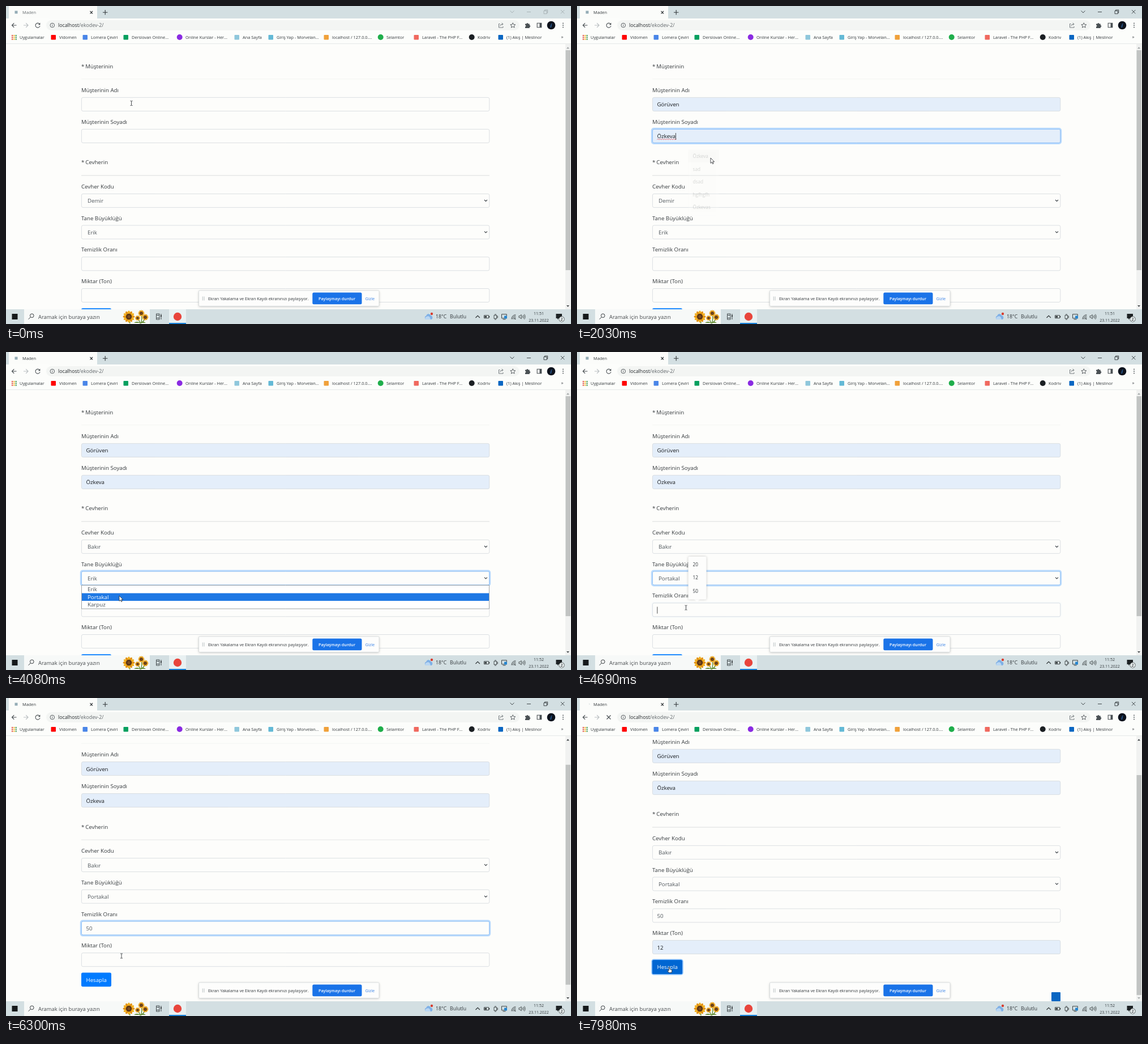
Write an HTML page with a canvas that moves like this. It is 998 px wide and 561 px high and loops after 8 s.

```html
<!DOCTYPE html>
<html lang="tr">
<head>
<meta charset="utf-8">
<title>Maden</title>
<style>
html, body { margin: 0; width: 100%; height: 100%; overflow: hidden; background: #fdfdfb; }
canvas { display: block; }
</style>
</head>
<body>
<canvas id="stage" width="998" height="561"></canvas>
<script>
const ctx = document.getElementById('stage').getContext('2d');
const LOOP = 8000, INK = '#34393d', ICON = '#4a5054', PAGE = '#fdfdfb', BAR = '#d3dfe2';
const LABEL_SIZE = 9.7;

const clamp = v => Math.max(0, Math.min(1, v));
const ramp = (t, start, length) => { const u = clamp((t - start) / length); return u * u * (3 - 2 * u); };
const during = (t, from, to) => t >= from && t < to;

function rect(x, y, w, h, fill, radius = 0, stroke, width = 1) {
  ctx.beginPath();
  ctx.roundRect(x, y, w, h, radius);
  if (fill) { ctx.fillStyle = fill; ctx.fill(); }
  if (stroke) { ctx.strokeStyle = stroke; ctx.lineWidth = width; ctx.stroke(); }
}
function disc(x, y, r, fill) {
  ctx.beginPath();
  ctx.arc(x, y, r, 0, 7);
  ctx.fillStyle = fill;
  ctx.fill();
}
function line(d, color = ICON, width = 1) {
  ctx.strokeStyle = color;
  ctx.lineWidth = width;
  ctx.stroke(new Path2D(d));
}
function shape(d, color) {
  ctx.fillStyle = color;
  ctx.fill(new Path2D(d));
}
// y is the middle of the capital letters
function text(s, x, y, size, color = INK, weight = 400, align = 'left') {
  ctx.font = `${weight} ${size}px "Open Sans", "Noto Sans", sans-serif`;
  ctx.textAlign = align;
  ctx.fillStyle = color;
  ctx.fillText(s, x, y + size * 0.36);
  return ctx.measureText(s).width;
}
function withAlpha(a, draw) {
  if (a <= 0) return;
  ctx.save();
  ctx.globalAlpha *= a;
  draw();
  ctx.restore();
}

// values: [time, text]; focus: [from, to]; auto: time of autofill
const fields = [
  { label: 'Müşterinin Adı', y: 161, focus: [450, 1500], values: [[0, ''], [1050, 'Görüven']], auto: 1050 },
  { label: 'Müşterinin Soyadı', y: 217, focus: [1500, 2480], values: [[0, ''], [1950, 'Özkeva']], auto: 1950, typo: 1950 },
  { label: 'Cevher Kodu', y: 331, focus: [2480, 3450], values: [[0, 'Demir'], [3080, 'Bakır']], select: true },
  { label: 'Tane Büyüklüğü', y: 386.6, focus: [3450, 4670], values: [[0, 'Erik'], [4120, 'Portakal']], select: true },
  { label: 'Temizlik Oranı', y: 442.4, focus: [4670, 6780], values: [[0, ''], [5300, '5'], [5460, '50']] },
  { label: 'Miktar (Ton)', y: 498.1, focus: [6780, 7830], values: [[0, ''], [7400, '12']], auto: 7400 }
];

const pointerKeys = [
  [0, 221.5, 171.5, 'beam'], [500, 221.5, 171.5, 'beam'], [800, 228, 207, 'arrow'], [1100, 228, 207, 'arrow'],
  [1420, 225, 230, 'beam'], [1600, 225, 230, 'beam'], [1880, 236, 268, 'arrow'], [2060, 236, 268, 'arrow'],
  [2400, 222, 343, 'arrow'], [2600, 222, 343, 'arrow'], [2900, 206, 374, 'arrow'], [3120, 206, 374, 'arrow'],
  [3320, 202, 402, 'arrow'], [3550, 202, 402, 'arrow'], [3900, 200, 430, 'arrow'], [4180, 200, 430, 'arrow'],
  [4500, 192.5, 451, 'beam'], [4800, 192.5, 451, 'beam'], [5100, 204, 455, 'beam'], [6450, 204, 455, 'beam'],
  [6700, 204, 447, 'beam'], [6900, 204, 447, 'beam'], [7200, 209, 358, 'arrow'], [7440, 209, 358, 'arrow'],
  [7720, 163, 475, 'hand'], [8000, 163, 475, 'hand']
];

function drawField(f, t) {
  const [from, to] = f.focus;
  const ring = ramp(t, from, 150) - ramp(t, to, 150);
  const [since, value] = f.values.filter(v => v[0] <= t).pop();
  const filled = t >= f.auto, mid = f.y + 13;
  text(f.label, 133, f.y - 12.5, LABEL_SIZE);
  withAlpha(ring, () => rect(132, f.y - 1, 723, 26.7, null, 3.5, '#b9dafd', 2.4));
  rect(133.4, f.y + 0.4, 720.4, 24, filled ? '#e4eefa' : PAGE, 2.6, '#d3d8dc', 0.8);
  withAlpha(ring, () => rect(133.4, f.y + 0.4, 720.4, 24, null, 2.6, '#80bdff', 0.9));
  const x = f.select ? 144 : 141.5;
  const width = text(value, x, mid, LABEL_SIZE, filled ? '#181b1e' : '#50575d');
  if (f.select) {
    line(`M845 ${f.y + 11}l2.5 2.4 2.5-2.4`, '#3c4247', 1.1);
    return;
  }
  if (!during(t, from, to)) return;
  if (t >= f.typo) {
    let wave = `M${x} ${mid + 5.6}`;
    for (let i = 0; i < width / 2; i++) wave += `l1 ${i % 2 ? 1 : -1}l1 0`;
    line(wave, '#e0464a', 0.8);
  }
  if ((t - Math.max(since, from)) % 1060 < 530) rect(x + width, mid - 6, 0.8, 12, '#222');
}

function heading(s, y) {
  text('*', 133, y, LABEL_SIZE);
  text(s, 140.2, y, LABEL_SIZE);
}

function suggestions(t, from, to, items, y, w, row, hoverAt, above) {
  withAlpha(ramp(t, from, 90) * (1 - clamp((t - to) / 100)), () => {
    const h = items.length * row + 5, x = 196.5;
    ctx.shadowColor = `rgba(0,0,0,${0.22 * ctx.globalAlpha})`;
    ctx.shadowBlur = 4;
    rect(x, y, w, h, '#fdfdfc', 2);
    ctx.shadowBlur = 0;
    ctx.shadowColor = 'transparent';
    shape(above ? `M207 ${y + h}h10l-5 4z` : `M207 ${y}h10l-5-4z`, '#fdfdfc');
    if (t >= hoverAt) rect(x, y + 1.5, w, row, '#e6e7e8');
    items.forEach((s, i) => text(s, x + 8, y + 2 + row * (i + 0.5), 8.2));
  });
}

function optionList(t, from, to, hoverAt, items, y) {
  if (!during(t, from, to)) return;
  const row = 13.5, chosen = t < hoverAt ? 0 : 1;
  rect(133.5, y, 720, items.length * row + 1, '#fff', 0, '#8a8d90', 0.8);
  rect(134, y + 0.5 + chosen * row, 719, row, '#1e78e4');
  items.forEach((s, i) => text(s, 144, y + 0.5 + row * (i + 0.5), LABEL_SIZE, i === chosen ? '#fff' : '#495057'));
}

function drawPage(t, scroll) {
  rect(0, 0, 998, 561, PAGE);
  ctx.save();
  ctx.translate(0, -scroll);
  heading('Müşterinin', 106.5);
  rect(133, 128.6, 721, 0.7, '#f0f1ef');
  heading('Cevherin', 276);
  rect(133, 298.6, 721, 0.8, '#dcdedd');
  fields.forEach(f => drawField(f, t));
  const focus = ramp(t, 7830, 150), hover = ramp(t, 7660, 150);
  withAlpha(focus, () => rect(132.2, 532.4, 54.6, 26.4, null, 3.4, '#8fc3fb', 2));
  rect(133, 533.2, 53, 24.8, '#007bff', 2.6);
  withAlpha(hover, () => rect(133, 533.2, 53, 24.8, '#0066d2', 2.6));
  text('Hesapla', 141.5, 546, LABEL_SIZE, '#fff');
  rect(838, 590, 16, 16, '#0a66c2', 1);
  ctx.restore();

  suggestions(t, 480, 1050, ['Görüven', 'asd', 'sad'], 196, 54, 22.5, 780);
  suggestions(t, 1520, 1950, ['Özkeva', 'sad', 'dsad', 'hgfhgfh', 'Özkevas'], 252, 54, 22.5, 1830);
  optionList(t, 2500, 3080, 2850, ['Demir', 'Bakır', 'Kömür'], 356);
  optionList(t, 3470, 4120, 3850, ['Erik', 'Portakal', 'Karpuz'], 411.5);
  suggestions(t, 4600, 5300, ['20', '12', '50'], 361, 32, 23.5, Infinity, true);
  suggestions(t, 6830, 7400, ['12', '20', '50'], 346, 32, 23.5, 7170, true);

  rect(988, 67, 10, 468, '#f1f2f1');
  rect(988.5, 78 + scroll * 0.817, 8.5, 388, '#c1c3c2');
  shape('M990 75.2h5l-2.5-3z', scroll > 1 ? '#3f4346' : '#9fa3a4');
  shape('M990 528h5l-2.5 3z', scroll > 70 ? '#a8abac' : '#4a4e50');
}

const bookmarks = [
  [94, 'Vidomen', '#f00'], [150, 'Lomera Çeviri', '#4a86e8'], [222, 'Derslovan Online...', '#04a05f'],
  [317, 'Online Kurslar - Her...', '#8a2be2', true], [418, 'Ana Sayfa', '#8fc7dc'],
  [478, 'Giriş Yap - Morvelan...', '#63b9d6'], [576, 'localhost / 127.0.0....', '#f0a13a'],
  [672, 'Selamtor', '#1fae4b', true], [735, 'Laravel - The PHP F...', '#f0695f'],
  [833, 'Kodriv', '#1b1f23', true], [884, '(1) Akış | Meslinor', '#0a66c2']
];

function drawBrowser(t) {
  const active = t >= 450, loading = t >= 7930;
  const control = active ? '#33383b' : '#a4aeb1';
  rect(0, 0, 998, 22, BAR);
  rect(5, -6, 156, 34, '#fbfcfa', 6);
  rect(0, 22, 998, 45, '#fcfdfb');
  if (loading) {
    const a = t / 160;
    ctx.beginPath();
    ctx.arc(18, 11, 4, a, a + 0.6);
    ctx.strokeStyle = '#d0d7da';
    ctx.lineWidth = 1;
    ctx.stroke();
  } else rect(15.5, 8.5, 5, 5, '#94acb6');
  text('Maden', 29, 11, 7.4, active ? INK : '#666c70');
  line('M148.5 9l4.6 4.6m0-4.6l-4.6 4.6M171 11.3h8.4m-4.2-4.2v8.4', '#33383b', 1.1);
  line('M890.5 8.5l3.5 3.4 3.5-3.4M920 10.5h7M950 8.5h5.2v5.2h-5.2zM951.5 8.5v-1.6h5.2v5.2h-1.5M980 7l6.4 6.4m0-6.4l-6.4 6.4', control, 0.9);

  line('M18.5 34h-8m3.8-3.8l-3.8 3.8 3.8 3.8', ICON, 1.2);
  line('M31 34h8m-3.8-3.8l3.8 3.8-3.8 3.8', '#b9bfc1', 1.2);
  if (loading) line('M52.5 30.5l7 7m0-7l-7 7', ICON, 1.2);
  else {
    line('M59.2 31.6a4 4 0 1 0 .8 3.4', ICON, 1.1);
    shape('M60.4 29.6v3.6h-3.6z', ICON);
  }
  rect(71, 25, 836, 18, '#f3f5f3', 9);
  line('M78 34a3.8 3.8 0 1 0 7.6 0a3.8 3.8 0 1 0-7.6 0M81.8 33.5v2.4M81.8 31.7v1', ICON, 0.9);
  const host = text('localhost', 92, 34, 8.8, '#25292c');
  text('/ekodev-2/', 92 + host, 34, 8.8, '#62686c');
  line('M872.5 31.5h-2v6.5h7.5v-2M872.5 35.5q.5-3.6 5-3.6m-1.8-2l2.4 2-2.4 2', '#686f73', 0.9);
  line('M895.3 29.7l1.3 2.9 3.2.3-2.4 2.1.7 3.1-2.8-1.6-2.8 1.6.7-3.1-2.4-2.1 3.2-.3z', ICON, 0.9);
  shape('M917 31.5h2.4a1.5 1.5 0 0 1 3 0h2.4v2.4a1.5 1.5 0 0 1 0 3v2h-7.8v-2.4a1.4 1.4 0 0 0 0-2.8z', ICON);
  line('M938.2 30.2h7.6v7.6h-7.6z', ICON, 1.1);
  rect(942.5, 30, 3.5, 8, ICON);
  disc(963, 34, 7.3, '#0c121c');
  shape('M961 38q.5-6 3.5-8 0 5-1.5 8z', '#234a78');
  [30.5, 34, 37.5].forEach(y => disc(984, y, 0.9, ICON));

  const dots = ['#e2574c', '#f2b632', '#4c9f5e', '#4a86e8'];
  for (let i = 0; i < 9; i++) rect(10 + i % 3 * 3.3, 51 + Math.floor(i / 3) * 3.3, 2.2, 2.2, dots[(i + Math.floor(i / 3)) % 4]);
  text('Uygulamalar', 24, 55.3, 7.4);
  bookmarks.forEach(([x, label, color, round]) => {
    if (round) disc(x - 10.3, 55, 5, color);
    else rect(x - 14.5, 51, 8.5, 8.5, color, 1);
    text(label, x, 55.3, 7.4);
  });
  text('»', 980.5, 54.5, 8);
  rect(0, 66, 998, 0.8, '#dfe3e2');
}

function drawSharingBar() {
  ctx.save();
  ctx.shadowColor = 'rgba(0,0,0,.22)';
  ctx.shadowBlur = 4;
  ctx.shadowOffsetY = 1;
  rect(340.5, 502, 318.5, 27.5, '#fdfdfc', 1.5);
  ctx.restore();
  rect(340.5, 502, 318.5, 27.5, null, 1.5, '#cfd4d6', 0.7);
  line('M347.3 512.5v7M350 512.5v7', '#bcc2c5', 1);
  text('Ekran Yakalama ve Ekran Kaydı ekranınızı paylaşıyor.', 357, 516, 7.3);
  rect(541.3, 505.5, 87.2, 20.8, '#1a73e8', 2.5);
  text('Paylaşmayı durdur', 584.5, 516, 7.2, '#fff', 600, 'center');
  text('Gizle', 634.5, 516, 7.4, '#3b82e6');
}

function sunflower(x, y, r) {
  for (let i = 0; i < 12; i++) {
    const a = i * Math.PI / 6;
    ctx.beginPath();
    ctx.ellipse(x + Math.cos(a) * r * 0.68, y + Math.sin(a) * r * 0.68, r * 0.36, r * 0.2, a, 0, 7);
    ctx.fillStyle = i % 2 ? '#f2b01e' : '#e39313';
    ctx.fill();
  }
  disc(x, y, r * 0.52, '#5a3518');
  disc(x, y, r * 0.25, '#7d4e22');
}

function drawTaskbar(t) {
  rect(0, 535, 998, 26, BAR);
  rect(10.5, 543, 10, 10, '#15191b');
  rect(32, 535, 222, 26, '#f7f9f8');
  line('M42.5 546.3a3.3 3.3 0 1 0 6.6 0a3.3 3.3 0 1 0-6.6 0M43.4 548.8l-3.8 3.9', '#33383b', 1);
  text('Aramak için buraya yazın', 57, 548.3, 9.4, '#45494c');
  line('M239 543q2 9-1 17M232 551q4 4 5 9M246 549q-2 7-7 10M217 550l2 10', '#5f8a2e', 1.4);
  shape('M226 559q5-4 11 0q5-4 10 0z', '#5f8a2e');
  sunflower(217, 548, 10);
  sunflower(239, 542, 5.5);
  sunflower(232.5, 550.5, 4.5);
  sunflower(246, 549, 5.5);
  line('M265.5 545.5h5.5v5h-5.5zM265.5 545v-2h5.5v2M265.5 551v2h5.5v-2M274 543v10', '#33383b', 0.9);
  rect(273, 545.5, 2, 2.4, '#33383b');
  rect(288, 535, 30, 26, '#e9f1f2');
  rect(288, 559, 30, 2, '#1780d8');
  disc(303, 548, 7.2, '#e8453c');

  shape('M742 553a3.4 3.4 0 0 1 .3-6.5a4.2 4.2 0 0 1 8-.6a3.7 3.7 0 0 1 .7 7.1z', '#7fb0e6');
  shape('M741.5 553a2.6 2.6 0 0 1 1-4.8a4 4 0 0 1 6.5 1.8l1 3z', '#b9d6f2');
  disc(752, 543, 2.2, '#d83b2e');
  text('18°C', 759, 548.3, 8.7);
  text('Bulutlu', 784, 548.3, 8.7);
  line('M829.5 550l3.7-3.7 3.7 3.7', '#2c3133', 1.1);
  line('M844.5 545.8h8.2v4.8h-8.2z', '#2c3133', 0.9);
  rect(845.5, 546.8, 3.5, 2.8, '#2c3133');
  rect(853, 547, 1.2, 2.4, '#2c3133');
  line('M862 545.5h4.5v6h-4.5zM866.5 547h2v3h-2M863 553h3M863 544h3', '#2c3133', 0.8);
  line('M875.5 543.8h8.8v7h-8.8zM877.5 552.8h5', '#2c3133', 0.9);
  rect(880, 546.5, 5, 5, '#2586d0', 1);
  line('M893 552.5a7.5 7.5 0 0 1 7.3-7.8M895 552.5a5.4 5.4 0 0 1 5.3-5.6M897.2 552.5a3.2 3.2 0 0 1 3.1-3.3', '#2c3133', 0.9);
  disc(899.5, 552, 0.9, '#2c3133');
  line('M906 546.7h1.8l2.4-2.2v7.4l-2.4-2.2h-1.8zM912 546.4q1.3 1.8 0 3.6M913.8 545q2.4 3.2 0 6.4M915.5 543.7q3.2 4.5 0 9', '#2c3133', 0.8);
  text(t < 4000 ? '11:51' : '11:52', 941, 542, 7, INK, 400, 'center');
  text('23.11.2022', 941, 554, 7, INK, 400, 'center');
  shape('M971.5 543h10.5v8h-6l-2 2.2v-2.2h-2.5z', '#1d2224');
  disc(981.5, 552.5, 5, '#2c3133');
  disc(981.5, 552.5, 4.4, '#e8efef');
  text('2', 981.5, 552.5, 7, INK, 600, 'center');
}

function drawPointer(t) {
  const next = Math.max(1, pointerKeys.findIndex(k => k[0] > t));
  const a = pointerKeys[next - 1], b = pointerKeys[next];
  const u = ramp(t, a[0], b[0] - a[0]), kind = (u < 0.5 ? a : b)[3];
  ctx.save();
  ctx.translate(a[1] + (b[1] - a[1]) * u, a[2] + (b[2] - a[2]) * u);
  if (kind === 'beam') line('M-2-4h1.4L0-3.5.6-4H2M0-3.5v7M-2 4h1.4L0 3.5.6 4H2', '#33373a', 0.9);
  else {
    const d = kind === 'arrow'
      ? 'M0 0V9.4L2.2 7.4 3.7 10.6 5.1 10 3.7 6.8H6.6Z'
      : 'M-.9.2Q0-.8.9.2V3.6L4 4.4Q5 4.8 4.8 6L4 9.5H-.7L-3.2 6Q-3 4.8-.9 6.2Z';
    shape(d, '#fff');
    line(d, '#25282b', 0.8);
  }
  ctx.restore();
}

function frame() {
  const t = performance.now() % LOOP;
  drawPage(t, 71 * ramp(t, 6050, 400));
  drawBrowser(t);
  drawSharingBar();
  drawTaskbar(t);
  drawPointer(t);
  requestAnimationFrame(frame);
}
frame();
</script>
</body>
</html>
```
